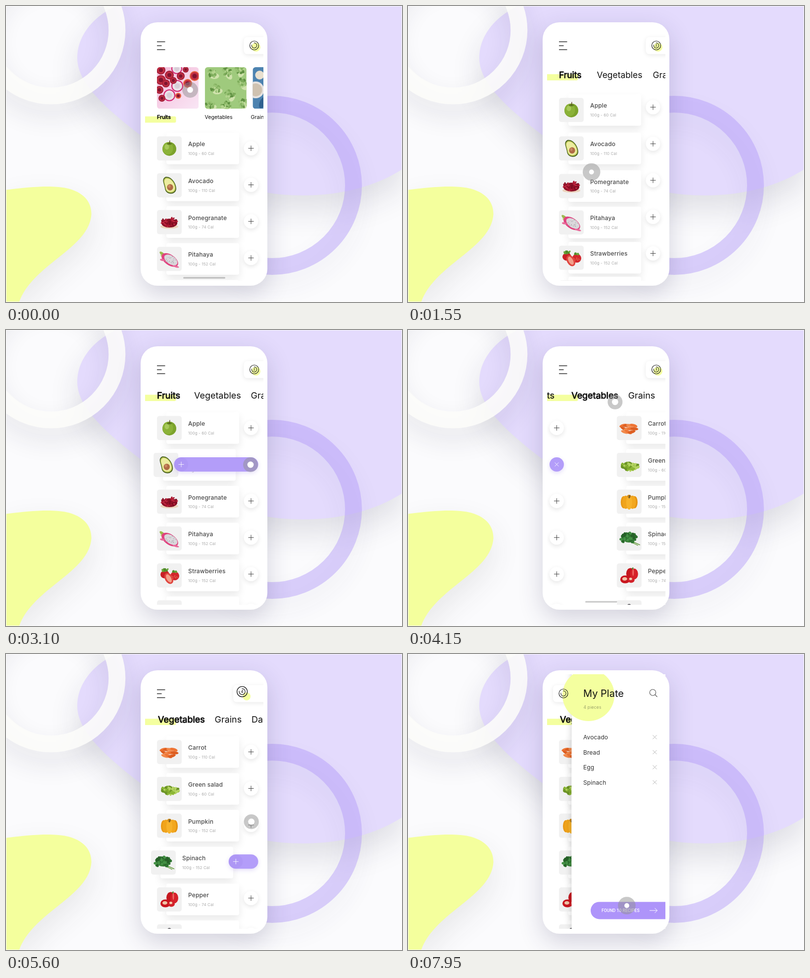
Recreate the animation shown at these times as an HTML page with a canvas. Size 800 by 600 pixels, loop 8 s.

```html
<!DOCTYPE html>
<html lang="en">
<head>
<meta charset="utf-8">
<title>Food picker</title>
<style>
html, body { margin: 0; width: 100%; height: 100%; overflow: hidden; background: #fbfbfd; }
canvas { display: block; }
</style>
</head>
<body>
<canvas id="stage" width="800" height="600"></canvas>
<script>
const LOOP = 8000;
const PURPLE = '#b39df9', YELLOW = '#f4ff9f';
const stage = document.getElementById('stage');
let c = stage.getContext('2d');

const clamp = v => Math.max(0, Math.min(1, v));
const lerp = (a, b, p) => a + (b - a) * p;
const span = (t, a, b) => clamp((t - a) / (b - a));
const cubic = p => p < .5 ? 4 * p ** 3 : 1 - 4 * (1 - p) ** 3;
const quad = p => p < .5 ? 2 * p * p : 1 - 2 * (1 - p) ** 2;
const outCubic = p => 1 - (1 - p) ** 3;
const spring = s => s < 0 ? 1 : Math.exp(-3 * s) * Math.cos(2 * Math.PI * s);

function shade(blur, dy, color) {
  c.shadowBlur = blur; c.shadowOffsetY = dy; c.shadowColor = color;
}
const noShade = () => shade(0, 0, 'transparent');

function box(x, y, w, h, r, fill) {
  c.beginPath(); c.roundRect(x, y, w, h, r);
  c.fillStyle = fill; c.fill();
}
function oval(x, y, rx, ry, fill, turn = 0) {
  c.beginPath(); c.ellipse(x, y, rx, ry, turn, 0, 7);
  c.fillStyle = fill; c.fill();
}
const dot = (x, y, r, fill) => oval(x, y, r, r, fill);
function line(color, width, ...pts) {
  c.beginPath();
  for (let i = 0; i < pts.length; i += 2) c.lineTo(pts[i], pts[i + 1]);
  c.strokeStyle = color; c.lineWidth = width; c.stroke();
}
function cross(x, y, r, turn, color, width = 1) {
  const a = Math.cos(turn) * r, b = Math.sin(turn) * r;
  line(color, width, x - a, y - b, x + a, y + b);
  line(color, width, x + b, y - a, x - b, y + a);
}
function text(s, x, midY, size, color, o = {}) {
  c.font = `${o.weight || 400} ${size}px ${o.family || 'Inter'}, sans-serif`;
  c.letterSpacing = (o.gap || 0) + 'px';
  c.textAlign = o.align || 'left';
  c.fillStyle = color;
  c.fillText(s, x, midY + size * .36);
  if (o.stroke) {
    c.strokeStyle = color; c.lineWidth = o.stroke; c.lineJoin = 'round';
    c.strokeText(s, x, midY + size * .36);
  }
}
function at(x, y, draw, alpha = 1) {
  c.save(); c.globalAlpha *= alpha; c.translate(x, y); draw(); c.restore();
}
function random(seed) {
  return () => (seed = (seed * 16807) % 2147483647) / 2147483647;
}
// A clump of small ovals inside an ellipse
function clump(seed, n, rx, ry, size, colors, dx = 0, dy = 0) {
  const rnd = random(seed);
  for (let i = 0; i < n; i++) {
    const a = rnd() * 6.28, d = Math.sqrt(rnd());
    oval(dx + Math.cos(a) * d * rx, dy + Math.sin(a) * d * ry,
      size, size * .7, colors[i % colors.length], rnd() * 3);
  }
}

const food = {
  Apple() {
    oval(0, 1, 14, 14, '#7ca32c'); oval(-3, 0, 10.5, 12.5, '#8bb238');
    oval(-5, -3, 4.5, 5.5, '#a8c95b');
    oval(0, -9.5, 5, 2, '#5f7f20');
    line('#5b4a26', 1.4, 0, -9, 1, -16);
  },
  Avocado() {
    const pear = (s, fill) => {
      c.beginPath();
      c.moveTo(-8 * s, -17 * s);
      c.bezierCurveTo(4 * s, -19 * s, 14 * s, -4 * s, 14 * s, 7 * s);
      c.bezierCurveTo(13 * s, 21 * s, -8 * s, 20 * s, -9 * s, 6 * s);
      c.bezierCurveTo(-10 * s, -3 * s, -17 * s, -12 * s, -8 * s, -17 * s);
      c.fillStyle = fill; c.fill();
    };
    pear(1, '#41591d'); pear(.9, '#b9c653'); pear(.79, '#ecec9f');
    oval(1.5, 4, 6.2, 6.5, '#b06b45'); oval(0, 2, 2.5, 3, '#c98a63');
  },
  Pomegranate() {
    oval(0, 9, 18, 4.5, '#ecd3bd');
    oval(0, 2, 16, 9, '#8c1127');
    clump(11, 65, 16, 9.5, 2, ['#a5142d', '#7d0d22', '#c02841']);
  },
  Pitahaya() {
    oval(-14, -10, 7, 3, '#9cb94f', .7); oval(-12, -6, 6, 2.5, '#c3cf72', .2);
    oval(1, 2, 19, 10.5, '#e0427f', .6);
    oval(-14, 2, 5, 2, '#e86a9a', .2); oval(13, 15, 7, 2, '#e86a9a', .3);
    oval(3, 2, 15, 8.5, '#d9d6da', .6);
    clump(5, 45, 12, 8, .7, ['#8c8890', '#f2f0f2'], 3, 2);
  },
  Strawberries() {
    oval(-9, -2, 9, 8, '#c81f26'); oval(11, 1, 9, 9, '#d3262c');
    clump(8, 14, 6, 3, 2.5, ['#4f8a2b', '#6ba53c'], -9, -11);
    clump(9, 9, 5, 2, 2.2, ['#4f8a2b', '#6ba53c'], 11, -8);
    oval(-1, 6, 8, 12, '#e0453f', -.5); oval(-1, 6, 4.5, 9, '#f2a08b', -.5);
    clump(3, 12, 7, 5, .6, ['#f3c27a'], 11, 3);
  },
  Mango() { oval(0, 0, 14, 11, '#e9b23b'); },
  Carrot() {
    for (let i = 0; i < 11; i++) {
      const row = Math.floor(i / 4);
      oval(-12 + i % 4 * 7 + row * 1.6, -5 + row * 6.5, 8, 3,
        ['#ee7434', '#dd5f22', '#f28a4c'][i % 3], .1 + (i % 5 - 2) * .2);
    }
  },
  'Green salad'() {
    oval(0, 4, 17, 7, '#7fa52d', .1);
    clump(21, 60, 18, 8, 3.2, ['#8cb735', '#6c9427', '#b5d463'], 1, 3);
  },
  Pumpkin() {
    [[13, 6], [-13, 6], [8, 7], [-8, 7], [0, 6]].forEach(([x, r], i) =>
      oval(x * .85, 1, r, 15 - Math.abs(x) * .2, ['#e69412', '#e99a18', '#f2a71f', '#f0a41c', '#f7b22b'][i]));
    oval(0, -11, 4, 3, '#d08a1b'); line('#6f5a2a', 2.4, 0, -7, 1, -13);
  },
  Spinach() {
    line('#6fa04a', 1.8, 0, 3, 22, 13); line('#6fa04a', 1.5, 0, 5, 18, 14);
    oval(0, 0, 13, 8, '#357a33');
    clump(33, 45, 16, 11, 3.8, ['#2f7431', '#439044', '#266028'], -1, 0);
  },
  Pepper() {
    oval(3, -4, 9, 11, '#c5171f'); oval(10, -3, 8, 11, '#d6222a');
    line('#4c8a2f', 2.4, 6, -12, 8, -16);
    oval(8, -6, 1.5, 7, '#ef6b66');
    oval(-8, 8, 10, 8, '#c9161f'); oval(-9, 7, 5, 3.5, '#f0c3a6');
    oval(4, 9, 7, 6, '#d3222a'); oval(3, 7, 3, 2.5, '#f2cfb0');
  },
  Eggplant() { oval(0, 0, 8, 17, '#4b4a50'); }
};

const pages = [
  { names: ['Apple', 'Avocado', 'Pomegranate', 'Pitahaya', 'Strawberries', 'Mango'],
    kcal: [60, 110, 74, 152, 152, 60] },
  { names: ['Carrot', 'Green salad', 'Pumpkin', 'Spinach', 'Pepper', 'Eggplant'],
    kcal: [110, 60, 152, 152, 74, 60] }
];
const picks = [{ page: 0, row: 1, start: 2850 }, { page: 1, row: 3, start: 5050 }];

// Pointer: [from, to, x, y] and pressed intervals
const moves = [
  [60, 860, 355, 417], [1000, 1750, 372, 330], [1900, 2600, 494, 273],
  [3250, 3700, 414, 130], [3960, 4760, 494, 420], [5410, 5900, 501, 82],
  [6020, 6700, 310, 83], [6900, 7700, 442, 510]
];
const presses = [[-200, 40], [960, 1800], [2720, 2900], [3740, 3900],
  [4900, 5100], [5950, 6660], [7760, 9000]];

function ring(x, y, r, width, color) {
  c.beginPath(); c.arc(x, y, r, 0, 7);
  c.strokeStyle = color; c.lineWidth = width; c.stroke();
}

function paintBackdrop() {
  c.fillStyle = '#fbfbfd'; c.fillRect(0, 0, 800, 600);

  shade(60, 30, 'rgba(40,40,70,.13)');
  c.fillStyle = '#e4dbfd';
  c.beginPath(); c.moveTo(240, -8);
  c.bezierCurveTo(172, 18, 144, 64, 144, 105);
  c.bezierCurveTo(144, 150, 186, 196, 272, 262);
  c.bezierCurveTo(370, 338, 480, 384, 600, 384);
  c.bezierCurveTo(680, 384, 750, 364, 802, 330);
  c.lineTo(802, -8); c.fill();

  shade(50, 25, 'rgba(40,40,70,.12)');
  ring(91, 49, 133.3, 34, 'rgba(253,253,251,.88)');
  shade(50, 25, 'rgba(60,50,110,.13)');
  ring(537.5, 363.5, 164.5, 34, 'rgba(173,148,247,.43)');

  shade(60, 25, 'rgba(60,60,60,.1)');
  c.fillStyle = '#f4ff9d';
  c.beginPath(); c.moveTo(-2, 373);
  c.bezierCurveTo(50, 366, 94, 363.5, 121, 369);
  c.bezierCurveTo(158, 377, 173, 398, 172.5, 422);
  c.bezierCurveTo(171, 455, 142, 482, 106, 510);
  c.bezierCurveTo(68, 540, 38, 566, 26, 602);
  c.lineTo(-2, 602); c.fill();

  shade(50, 16, 'rgba(50,45,90,.2)');
  box(272, 33, 256, 534, 34, '#fff');
  noShade();
  c.strokeStyle = 'rgba(255,255,255,.75)'; c.lineWidth = 1;
  c.strokeRect(.5, .5, 799, 599);
}

const photos = [
  () => {
    const g = c.createLinearGradient(0, 0, 84, 84);
    g.addColorStop(0, '#f4bcd9'); g.addColorStop(1, '#f9e6f5');
    box(0, 0, 84, 84, 0, g);
    const slices = [[8, 6, 9], [40, 3, 11], [58, 5, 6], [25, 16, 9], [48, 18, 8], [76, 18, 10],
      [8, 26, 10], [18, 33, 8], [41, 38, 12], [62, 33, 9], [5, 46, 8], [25, 57, 12],
      [10, 63, 7], [43, 58, 6], [33, 27, 7]];
    slices.forEach(([x, y, r], i) => {
      const pale = r > 10, rim = pale ? '#d3246f' : i % 4 == 1 ? '#e6653a' : '#a11f38';
      dot(x, y, r, rim); dot(x, y, r - 2, pale ? '#e9e1e8' : '#c22e42');
      dot(x, y, r * .45, pale ? '#d8ced8' : '#7f1430');
    });
  },
  () => {
    box(0, 0, 84, 84, 0, '#9fca7d');
    [[15, 12], [44, 10], [70, 5], [22, 43], [74, 32], [51, 54], [10, 76], [42, 78], [78, 72]].forEach(([x, y], i) => {
      oval(x + 4, y + 6, 10, 6, '#cfe2ac', i);
      at(x, y, () => clump(40 + i, 26, 9, 8, 3.2, ['#7fae5c', '#98c274', '#5f9142', '#b4d58f']));
    });
  },
  () => {
    box(0, 0, 84, 84, 0, '#4d83b0');
    dot(14, 16, 9, '#e9e0cf'); dot(6, 46, 17, '#e6e2df'); dot(6, 46, 13, '#cfc2b0');
    oval(20, 72, 6, 12, '#2f618f', .4); dot(50, 40, 20, '#e8dfd0');
  }
];

function drawPhotos(p) {
  if (p >= .5) return;
  photos.forEach((paint, i) => at(305 + i * 96.7, 124 - p * 50, () => {
    c.beginPath(); c.roundRect(0, 0, 84.5, 84.5, 6); c.clip();
    paint();
  }, 1 - 2 * p));
}

function drawTabs(p, g) {
  const size = lerp(10.65, 17.95, p), y = lerp(225.5, 133, p);
  box(281, y - 1.7, 62.5, 12.6, [0, 3, 3, 0], YELLOW);
  const bold = lerp(.7, .9, p);
  text('Fruits', 305 - 82 * g, y, size, '#111', { stroke: bold * (1 - g) });
  text('Vegetables', lerp(401.5, 380, p) - 73 * g, y, size, '#111', { stroke: bold * clamp(g * 1.4) });
  text('Grains', 494.5 - 73 * g, y, size, '#111');
  text('Dairy', 580 - 84 * g, y, size, '#111');
}

function drawCard(name, kcal, x, y) {
  shade(16, 8, 'rgba(0,0,0,.085)');
  box(x + 19, y - 32, 147, 64, 4, '#fff');
  noShade();
  box(x, y - 24.5, 50, 49, 5, '#f1f1f1');
  at(x + 25, y, food[name]);
  text(name, x + 63, y - 8.7, 12, '#4a4a4a', { weight: 500, gap: .15 });
  text(`100g - ${kcal} Cal`, x + 63, y + 10.4, 8, '#aaa', { gap: .12 });
}

function drawButton(x, y) {
  shade(10, 3, 'rgba(0,0,0,.1)');
  dot(x, y, 14.5, '#fff');
  noShade();
  cross(x, y, 5.5, 0, '#444');
}

// The pill grows left from the button, then folds back into a round "remove" button
function drawPick(x, y, dt) {
  const reach = 141 * (quad(span(dt, 0, 240)) - quad(span(dt, 350, 650)));
  const left = x - reach;
  c.globalAlpha = span(dt, 0, 80);
  shade(8, 3, 'rgba(120,90,220,.2)');
  box(left - 14.5, y - 14.5, reach + 29, 29, 14.5, PURPLE);
  noShade();
  if (reach > 1) dot(left, y, 14, 'rgba(140,115,225,.12)');
  cross(left, y, 5.5, quad(span(dt, 600, 750)) * Math.PI / 4, 'rgba(255,255,255,.85)');
  c.globalAlpha = 1;
}

function drawPage(index, t, g) {
  const page = pages[index], away = index - g;
  if (Math.abs(away) >= 1) return;
  const scroll = lag => 90 * (1 - cubic(span(t - lag, 1000, 1750)));
  const pick = picks[index], dt = t - pick.start;
  const shift = 12 * (quad(span(dt, 0, 470)) - quad(span(dt, 600, 850)));
  page.names.forEach((name, i) => {
    const lag = 71 - 6.5 * (i - 2.1) ** 2;
    drawCard(name, page.kcal[i], 305 + away * 368 - (i == pick.row ? shift : 0), 198.7 + i * 74.7 + scroll(lag));
  });
  for (let i = 0; i < 6; i++) {
    const x = 495 + away * 285, y = 198.4 + i * 74.1 + scroll(0);
    if (i != pick.row || dt < 80) drawButton(x, y);
    if (i == pick.row && dt > 0) drawPick(x, y, dt);
  }
}

function drawPlate(t, open) {
  const s = (t - 6250) / 1000;
  const top = lerp(531, 331, open), bottom = 331 + 200 * spring(s);
  shade(14, 0, 'rgba(0,0,0,.2)');
  c.beginPath();
  c.moveTo(top, 30); c.lineTo(top, 115);
  c.quadraticCurveTo(bottom - 1, 270, bottom, 560);
  c.lineTo(740, 560); c.lineTo(740, 30);
  c.fillStyle = '#fff'; c.fill();
  noShade();
}

function drawPlateContent(t) {
  const titleX = 354 + 200 * (1 - outCubic(span(t, 6165, 6965)));
  const itemX = 354 + 200 * (1 - outCubic(span(t, 6350, 7250)));
  const late = span(t, 6900, 7400);
  text('My Plate', titleX, 80, 20, '#111');
  c.globalAlpha = span(t, 6450, 6910);
  ['Avocado', 'Bread', 'Egg', 'Spinach'].forEach((s, i) =>
    text(s, itemX, 169 + i * 30.5, 12, '#333', { gap: .1 }));
  c.globalAlpha = late;
  text('4 pieces', 354.5, 107.5, 8.5, '#7d8458', { weight: 300, gap: .3 });
  for (let i = 0; i < 4; i++) cross(498.5, 168.5 + i * 30.5, 5.7, Math.PI / 4, '#b5b5b5');
  ring(494.5, 78, 6.2, 1.1, '#555');
  line('#555', 1.1, 499, 82.5, 503.5, 87);
  c.globalAlpha = 1;

  const y = 520 + 36 * spring((t - 6250) / 1000);
  box(369, y - 17.5, 160, 35, [17.5, 0, 0, 17.5], '#ae94fa');
  text('FOUND 10 RECIPES', 391, y, 8.7, '#fff', { weight: 500, family: 'Roboto' });
  line('#fff', 1, 488, y, 503.5, y);
  line('#fff', 1, 498.5, y - 5, 503.5, y, 498.5, y + 5);
}

function counterState(t, open) {
  const bump = Math.max(...picks.map(p => Math.sin(Math.PI * span(t - p.start, 400, 720))));
  const count = 2 + picks.filter(p => t > p.start + 450).length;
  return { x: lerp(501.5, 314, open) - 24.5 * bump, y: 80 - 3.7 * bump, bump, count };
}

function drawCounterIcon(k, t) {
  at(k.x, k.y, () => {
    const z = 1 + .16 * k.bump;
    c.scale(z, z);
    ring(0, 0, 9, 1.2, '#222');
    c.beginPath(); c.arc(0, 0, 5.2, -1.7, 3.4);
    c.lineWidth = 1.1; c.stroke();
    c.globalAlpha = span(t, 200, 450) * (1 - span(t, 6050, 6250));
    text(k.count, 0, 0, 6.5, '#222', { align: 'center', weight: 500 });
  });
}

function drawPointer(t) {
  let x = 372, y = 170;
  for (const [a, b, tx, ty] of moves) {
    const p = cubic(span(t, a, b));
    x = lerp(x, tx, p); y = lerp(y, ty, p);
  }
  const press = Math.max(...presses.map(([a, b]) => clamp(Math.min(t - a, b - t) / 120)));
  dot(x, y, 15 + 2.8 * press, 'rgba(145,145,145,.5)');
  dot(x, y, 6.4 - 1.5 * press, '#fff');
}

const backdrop = document.createElement('canvas');
backdrop.width = 800; backdrop.height = 600;
const screenCtx = c;
c = backdrop.getContext('2d');
paintBackdrop();
c = screenCtx;

function render(t) {
  const p = cubic(span(t, 1000, 1750));
  const g = cubic(span(t, 3786, 4426));
  const open = cubic(span(t, 6020, 6700));
  const k = counterState(t, open);

  c.drawImage(backdrop, 0, 0);
  c.save();
  c.beginPath(); c.rect(281, 41, 239, 516); c.clip();

  box(358, 549.5, 85, 3, 1.5, '#c8c8c8');
  line('#222', 1.4, 305, 72.5, 321.5, 72.5);
  line('#222', 1.4, 305, 80.5, 314.5, 80.5);
  line('#222', 1.4, 305, 88.5, 321.5, 88.5);
  drawPhotos(p);
  drawTabs(p, g);
  drawPage(0, t, g);
  drawPage(1, t, g);

  shade(10, 2, 'rgba(0,0,0,.09)');
  box(k.x - 21 + 3 * k.bump, 63, 70, 34.5, 7, '#fff');
  noShade();
  if (open > 0) drawPlate(t, open);
  dot(lerp(505, 364.5, open) - 19 * k.bump, 83.5 + 2.5 * k.bump, lerp(9, 52.5, open) - k.bump, YELLOW);
  if (open > 0) drawPlateContent(t);
  drawCounterIcon(k, t);
  c.restore();

  drawPointer(t);
}

const begin = performance.now();
function tick() {
  render((performance.now() - begin) % LOOP);
  requestAnimationFrame(tick);
}
tick();
</script>
</body>
</html>
```
